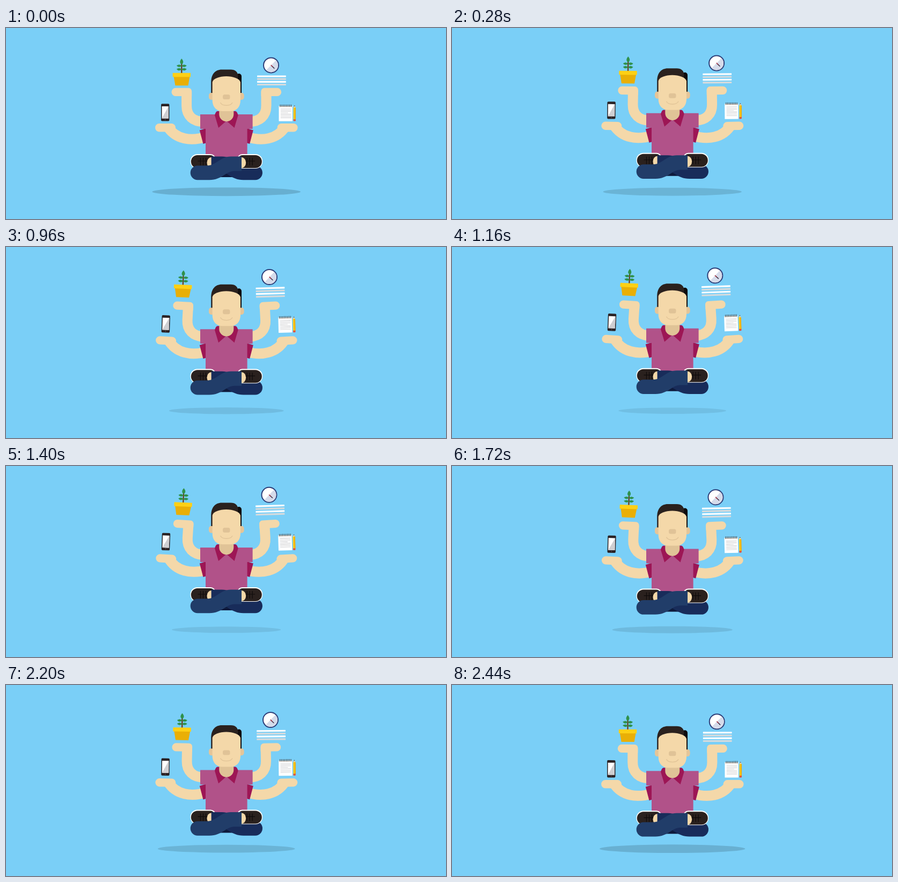
Write an HTML page with a canvas that moves like this. It is 820 px wide and 356 px high and loops after 2520 ms.

```html
<!DOCTYPE html>
<html>
<head>
<meta charset="utf-8">
<style>
html, body { margin: 0; width: 100%; height: 100%; overflow: hidden; background: #7acff7; }
canvas { display: block; }
</style>
</head>
<body>
<canvas id="stage" width="820" height="356"></canvas>
<script>
const ctx = document.getElementById('stage').getContext('2d');
const LOOP = 2520, STEP = 40, LAST = 2440, MID_X = 410.8;
const SKIN = '#f4d8a9', SKIN_DARK = '#e0c397', SHIRT = '#b15289', WINE = '#9d1655';
const JEANS = '#213d69', JEANS_DARK = '#182c5a', HAIR = '#2a211e';

function path(d, color) {
  ctx.fillStyle = color;
  ctx.fill(new Path2D(d));
}
function line(d, color, width) {
  ctx.strokeStyle = color;
  ctx.lineWidth = width;
  ctx.stroke(new Path2D(d));
}
function box(x, y, w, h, color, r = 0) {
  ctx.fillStyle = color;
  ctx.beginPath();
  ctx.roundRect(x, y, w, h, r);
  ctx.fill();
}
function oval(x, y, rx, ry, color) {
  ctx.fillStyle = color;
  ctx.beginPath();
  ctx.ellipse(x, y, rx, ry, 0, 0, Math.PI * 2);
  ctx.fill();
}
function mirrored(draw) {
  ctx.save();
  ctx.translate(2 * MID_X, 0);
  ctx.scale(-1, 1);
  draw();
  ctx.restore();
}
function bothSides(draw) {
  draw();
  mirrored(draw);
}
// Draws a part turned by deg around (x, y) and shifted by (dx, dy)
function posed(x, y, dx, dy, deg, draw) {
  ctx.save();
  ctx.translate(x + dx, y + dy);
  ctx.rotate(deg * Math.PI / 180);
  ctx.translate(-x, -y);
  draw();
  ctx.restore();
}

function upperArm() {
  line('M336.6 118 V145 C336.6 164 349 174.5 368 174.5', SKIN, 19);
  box(308.5, 111.7, 37.6, 15.2, SKIN, [7.5, 6, 0, 7.5]);
}
function lowerArm() {
  line('M301 184 C317 208 345 212 373 202.5', SKIN, 19);
  box(278, 178, 38, 15.4, SKIN, 7.7);
}
function arms(lift) {
  posed(363, 172, 0, 0, 4 * lift, upperArm);
  posed(364, 204, 0, 0, 4 * lift, lowerArm);
}

function shoe() {
  box(343.5, 235, 47, 27, '#fff', [13, 9, 4, 13]);
  box(344.8, 237, 44, 24, HAIR, [12, 8, 3, 12]);
  line('M362.5 242 V256 M367.5 242 V256 M372.5 242 V256 M357.5 248 H376', '#0f0b0b', 1.2);
  oval(382.5, 251, 8, 10, SKIN);
}
function leg(color) {
  path('M357 256.5 H374 C393 256.5 398 239.5 419 239.5 H439 V266.5 H426 ' +
       'C410 266.5 403 283.2 379 283.2 H357 A13.35 13.35 0 0 1 357 256.5 Z', color);
}
function legs() {
  box(396, 262, 30, 16, '#0e1a3c');
  shoe();
  mirrored(() => leg(JEANS_DARK));
  mirrored(shoe);
  leg(JEANS);
}

function shirt() {
  bothSides(() => path('M360.8 190.5 L373 187 V214.2 L367.5 216 Z', WINE));
  path('M362 161 H459.6 V188 H449.6 V241 H372 V188 H362 Z', SHIRT);
  path('M397 155 H394 Q391 155 389 162.5 L396 186 L410.8 173 L425.6 186 L432.6 162.5 ' +
       'Q430.5 155 427.5 155 Z', WINE);
  path('M397.3 145 H424.3 V160.7 A13.5 13.5 0 0 1 397.3 160.7 Z', SKIN_DARK);
}

function head() {
  bothSides(() => box(378, 120.5, 10, 13.5, '#e5c598', 5));
  box(430, 85, 9, 36, '#0e0b0b', [4, 5, 0, 0]);
  path('M382.2 121 V101 C382.2 86 390 77.5 402 77.5 H419 C427 77.5 432.5 82 432.5 90 ' +
       'L430 121 Z', HAIR);
  path('M384.6 101 C386 94 398 90 410.5 90 C423 90 435 94 437 101 V134 ' +
       'C437 148 429 155 418 155 H403.5 C392.5 155 384.6 148 384.6 134 Z', SKIN);
  box(404, 124, 13.5, 9, SKIN_DARK, 3.5);
  line('M399.5 139 C403 146 418.5 146 422 139', SKIN_DARK, 1.3);
}

function leaf(x, y, side) {
  path(`M${x} ${y} q${side * 3} -5 ${side * 9.5} -1 q${side * -4} 5 ${side * -9.5} 1 Z`, '#2f914b');
}
function plant() {
  line('M327.3 65 V85', '#6b4024', 2.4);
  path('M327.3 57 Q333.5 64 327.3 68 Q321 64 327.3 57 Z', '#2f914b');
  for (const y of [71, 77.5]) {
    leaf(327.3, y, -1);
    leaf(327.3, y, 1);
  }
  path('M312.5 90 H342.5 L339.5 107.2 H315.5 Z', '#e9af06');
  box(310.6, 83.8, 33.4, 7.4, '#fdd015', 0.5);
}

function phone() {
  box(289, 141.3, 15.4, 32.3, '#2a2224', 2);
  box(290.5, 146, 12.4, 22.6, '#fff');
  path('M302.9 146 V168.6 H290.5 Z', '#cfcfd2');
  oval(296.7, 171, 1, 1, '#55494b');
}

function clockAndPapers() {
  oval(494, 69.4, 15, 15, '#2d3e78');
  oval(494, 69.4, 13, 13, '#fff');
  path('M503.2 60.2 A13 13 0 0 1 484.8 78.6 Z', '#d5dbea');
  line('M495 70.4 L500.3 75.5', '#33263a', 1.4);
  line('M493.6 69 L497 72.2', '#a8323f', 1.4);
  for (let i = 0; i < 4; i++) {
    box(468, 88.4 + i * 5.2, 53.8, 3.1, i % 2 ? '#d6dbdd' : '#fff', 0.6);
  }
}

function notebook() {
  box(508.5, 145.5, 25.3, 28.2, '#fff');
  box(508.5, 145.5, 25.3, 2, '#e6e2da');
  for (let i = 0; i < 8; i++) box(510.6 + i * 2.9, 142.8, 1.1, 4.3, '#4a4443');
  for (let i = 0; i < 8; i++) {
    box(511.8, 150.4 + i * 2.4, i === 3 ? 14 : 19.5, 0.8, '#c9c9cb');
  }
  path('M535.6 149 L537.8 144 L540 149 Z', '#efd2a0');
  path('M537 146 L537.8 144 L538.6 146 Z', '#3a302c');
  box(535.6, 148.5, 4.4, 22, '#fbc81a');
  box(538.4, 148.5, 1.6, 22, '#eaa90d');
  box(535.6, 170.2, 4.4, 3.4, '#e2503c', [0, 0, 1, 1]);
}

function draw(time) {
  const now = Math.min(Math.floor(time % LOOP / STEP) * STEP, LAST);
  const lift = 1 - Math.abs(now - LOOP / 2) / (LOOP / 2);

  ctx.fillStyle = '#7acff7';
  ctx.fillRect(0, 0, 820, 356);

  const spread = 1 - 0.298 * lift;
  oval(410.7, 305.2, 138.4 * spread, 8 * spread, `rgba(0,0,0,${0.153 - 0.08 * lift})`);

  ctx.save();
  ctx.translate(0, -10.1 * lift);
  bothSides(() => arms(lift));
  shirt();
  head();
  legs();
  ctx.restore();

  posed(328, 82, 3.4 * lift, -17.6 * lift, 3 * lift, plant);
  posed(297, 158, 1.4 * lift, -18.5 * lift, 2.5 * lift, phone);
  posed(495, 90, -3.3 * lift, -17.6 * lift, -2 * lift, clockAndPapers);
  posed(524, 158, -1.1 * lift, -18.5 * lift, -2 * lift, notebook);
}

let start;
function tick(time) {
  start ??= time;
  draw(time - start);
  requestAnimationFrame(tick);
}
draw(0);
requestAnimationFrame(tick);
</script>
</body>
</html>
```
